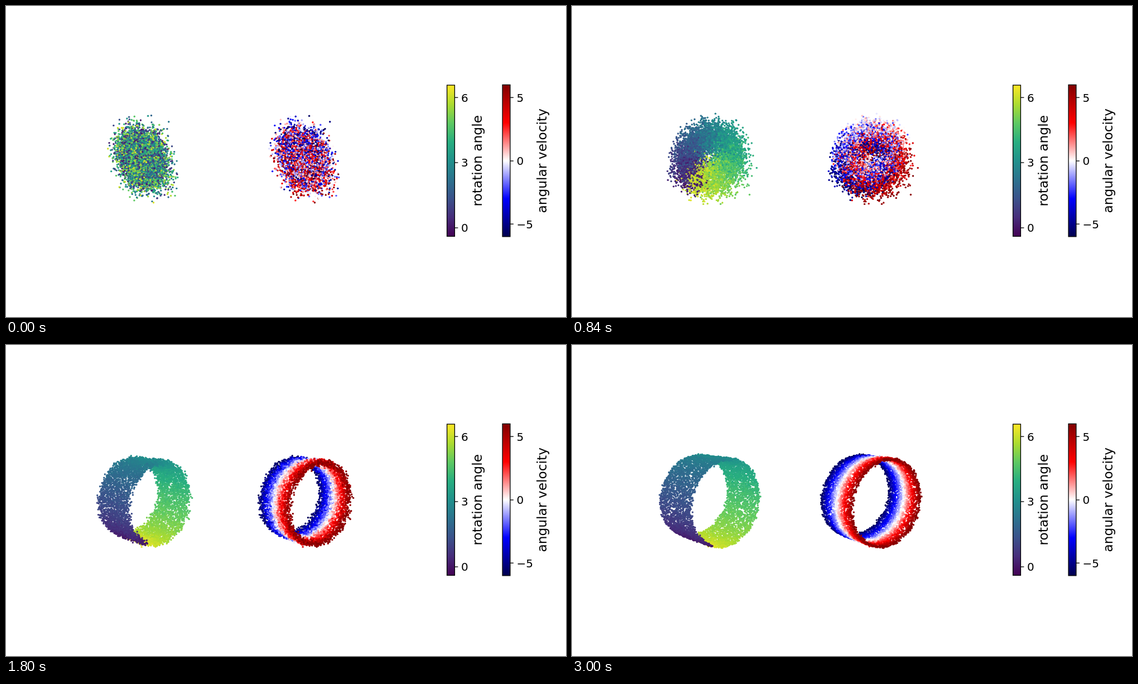
An HTML page with a canvas for the animation above (4200 ms loop, 1004 px wide and 558 px high).

```html
<!DOCTYPE html>
<html lang="en">
<head>
<meta charset="utf-8">
<title>Rotation manifold</title>
<style>
  html, body { margin: 0; width: 100%; height: 100%; overflow: hidden; background: #fff; }
  canvas, svg { position: absolute; left: 0; top: 0; width: 1004px; height: 558px; }
  text { font-family: "DejaVu Sans", sans-serif; font-size: 20px; }
  .label { font-size: 23.33px; text-anchor: middle; }
</style>
</head>
<body>
<canvas id="dots" width="1004" height="558"></canvas>
<svg id="bars" viewBox="0 0 1004 558"></svg>
<script>
const LOOP = 4200, STEP = 120, LAST = 25;
const COUNT = 7000, RADIUS = 1.7, PANEL_SHIFT = 289;
const TAU = Math.PI * 2;

const VIRIDIS = ['#440154', '#472d7b', '#3b528b', '#2c728e', '#21918c', '#28ae80', '#5ec962', '#addc30', '#fde725'];
const SEISMIC = ['#00004d', '#0000ff', '#ffffff', '#ff0000', '#800000'];

// step, centre x, centre y, radius x, radius y, half axis, noise, phase, order
const RINGS = [
  [7, 246, 273, 41, 38, 13, 11.5, 0.3, 0],
  [13, 246, 279, 52.5, 69, 25.5, 3.4, 0, 1],
  [18, 248, 277.5, 55.5, 71.5, 28.5, 2.2, 0, 1],
  [22, 248.5, 278, 58, 73.5, 28.5, 1.6, 0, 1],
  [25, 246.5, 277, 60.5, 75.5, 28.5, 1.2, 0, 1]
];

const lerp = (a, b, p) => a + (b - a) * p;
const clamp = v => Math.min(1, Math.max(0, v));

let seed = 20477;
function random() {
  seed = (seed + 0x6D2B79F5) | 0;
  let t = Math.imul(seed ^ (seed >>> 15), 1 | seed);
  t = (t + Math.imul(t ^ (t >>> 7), 61 | t)) ^ t;
  return ((t ^ (t >>> 14)) >>> 0) / 4294967296;
}
// Bell curve with light tails
const bell = () => (random() + random() + random() + random() - 2) * Math.sqrt(3);

function colour(map, value) {
  const pos = clamp(value) * (map.length - 1);
  const i = Math.min(map.length - 2, Math.floor(pos));
  const channel = (hex, c) => parseInt(hex.slice(1 + 2 * c, 3 + 2 * c), 16);
  const rgb = [0, 1, 2].map(c => Math.round(lerp(channel(map[i], c), channel(map[i + 1], c), pos - i)));
  return `rgb(${rgb})`;
}

const points = Array.from({ length: COUNT }, () => {
  const angle = random() * TAU;
  const speed = random() * 2 - 1;
  return {
    angle, speed,
    u: bell(), gx: bell(), gy: bell(), rank: random() * 2 - 1,
    angleColour: colour(VIRIDIS, (angle + 0.08 * bell() + 0.385) / 6.95),
    speedColour: colour(SEISMIC, (speed + 1) / 2)
  };
});

function ringAt(step) {
  let i = 0;
  while (i < RINGS.length - 2 && step > RINGS[i + 1][0]) i++;
  const [a, b] = [RINGS[i], RINGS[i + 1]];
  const p = clamp((step - a[0]) / (b[0] - a[0])) ** 0.8;
  return a.map((v, n) => lerp(v, b[n], p));
}

// An untrained blob that bends into a crescent
function cloudPosition(d, bend) {
  const blobX = 245 + 20 * d.gx + 4.5 * d.u;
  const blobY = 274 + 25 * d.u + 5 * d.speed;
  const s = 2 * Math.tanh(d.u / 1.6);
  const arcX = 284 + 17.5 * s - 11.5 * s * s + 13 * d.gx;
  const arcY = 267 + 29 * s + 3.5 * s * s + 11 * d.gy + 4 * d.speed;
  return [lerp(blobX, arcX, bend), lerp(blobY, arcY, bend)];
}

// An oblique cylinder: angle runs around it, speed along its axis
function ringPosition(d, ring) {
  const [, cx, cy, rx, ry, axis, noise, phase, order] = ring;
  const c = Math.cos(d.angle + phase), s = Math.sin(d.angle + phase);
  const sag = (1 - order) * 19 * (2 * Math.abs(d.speed) - 1);
  return [
    cx - rx * (0.33 * c + 0.945 * s) + axis * d.speed + noise * d.gx,
    cy + ry * (0.98 * c - 0.18 * s) + axis * d.speed * (0.25 + 0.13 * c) + noise * d.gy + sag
  ];
}

const ctx = document.getElementById('dots').getContext('2d');

function dot(x, y, fill) {
  ctx.fillStyle = fill;
  ctx.beginPath();
  ctx.arc(x, y, RADIUS, 0, TAU);
  ctx.fill();
}

function draw(step) {
  const ring = ringAt(step);
  const order = ring[8];
  const bend = clamp(step / 3);
  const form = clamp((step - 3) / 4);
  const placed = points.map(d => {
    const [ax, ay] = cloudPosition(d, bend);
    const [bx, by] = ringPosition(d, ring);
    return { d, x: lerp(ax, bx, form), y: lerp(ay, by, form), depth: lerp(d.rank, d.speed, order) };
  }).sort((a, b) => a.depth - b.depth);

  ctx.clearRect(0, 0, 1004, 558);
  for (const { d, x, y } of placed) {
    dot(x, y, d.angleColour);
    dot(x + PANEL_SHIFT, y, d.speedColour);
  }
}

function colourBar(id, map, x, top, bottom, ticks, label, labelX) {
  const stops = map.map((c, i) => `<stop offset="${i / (map.length - 1)}" stop-color="${c}"/>`).join('');
  const marks = ticks.map(([text, y]) =>
    `<path d="M${x + 14} ${y}h5.8" stroke="#000" stroke-width="1.33"/>
     <text x="${x + 25.3}" y="${y + 7.4}">${text}</text>`).join('');
  return `<linearGradient id="${id}" x1="0" y1="1" x2="0" y2="0">${stops}</linearGradient>
    <rect x="${x}" y="${top}" width="13.8" height="${bottom - top}" fill="url(#${id})" stroke="#000" stroke-width="1.33"/>
    ${marks}
    <text class="label" transform="translate(${labelX} 277.8) rotate(-90)">${label}</text>`;
}

document.getElementById('bars').innerHTML =
  colourBar('angleMap', VIRIDIS, 790.6, 142, 413.3, [['6', 164.2], ['3', 281], ['0', 398]], 'rotation angle', 853) +
  colourBar('speedMap', SEISMIC, 890.1, 141.4, 413.8, [['5', 164.2], ['0', 278], ['−5', 391.2]], 'angular velocity', 968.5);

const start = performance.now();
let shown = -1;
function tick() {
  const time = (performance.now() - start) % LOOP;
  const step = Math.min(LAST, Math.floor(time / STEP));
  if (step !== shown) draw(shown = step);
  requestAnimationFrame(tick);
}
tick();
</script>
</body>
</html>
```
